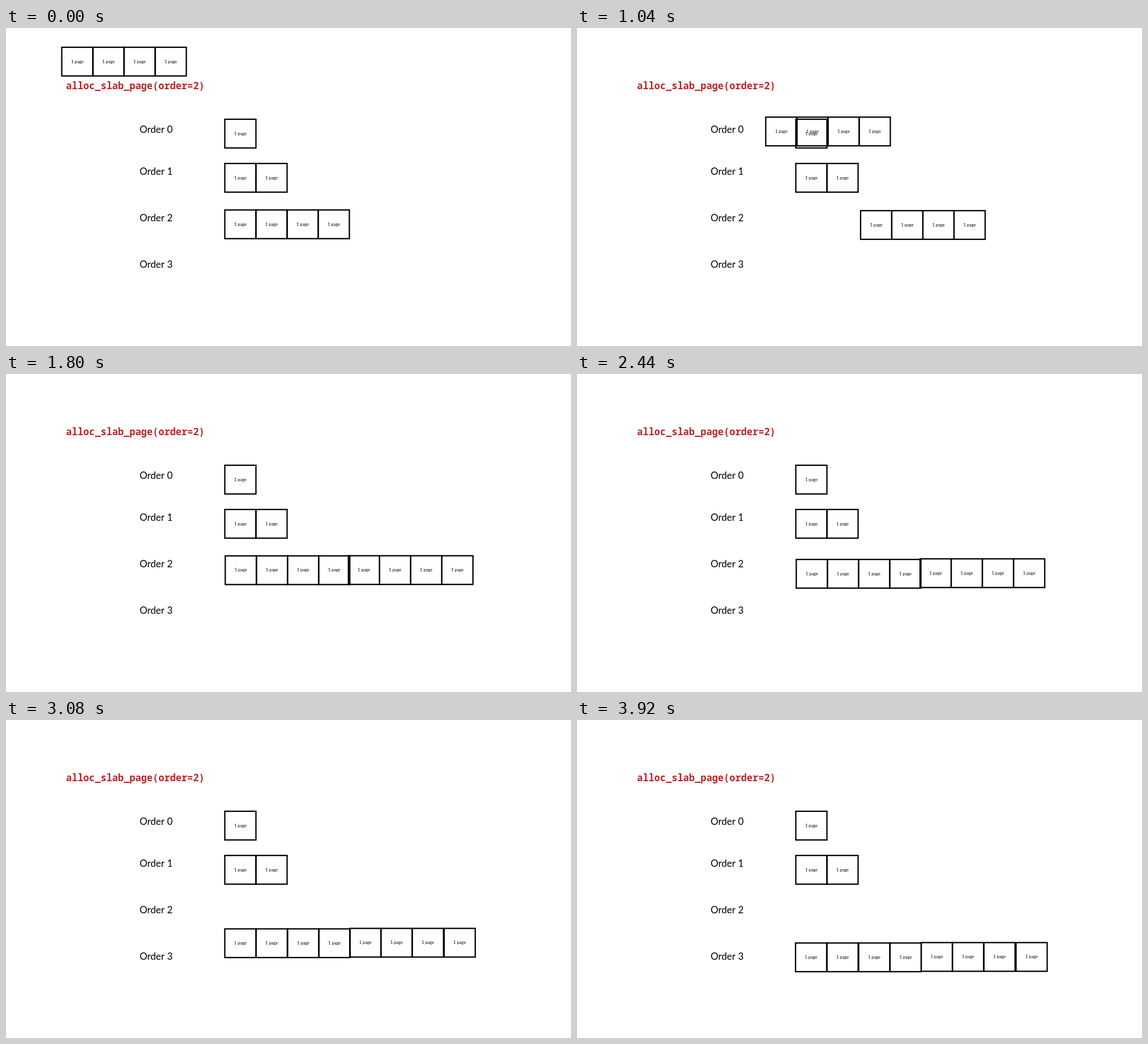
Write an HTML page that moves like this. It is 998 px wide and 561 px high and loops after 3960 ms.

```html
<!DOCTYPE html>
<html lang="en">
<head>
<meta charset="utf-8">
<title>Slab page allocation</title>
<style>
  html, body { margin: 0; width: 100%; height: 100%; overflow: hidden; background: #fff; }
  svg { display: block; width: 998px; height: 561px; }
  rect { fill: none; stroke: #000; stroke-width: 2.3; }
  .page { font: 7.5px Lato, sans-serif; text-anchor: middle; }
  .order { font: 17px Lato, sans-serif; word-spacing: .6px; }
  .call { font: bold 17px "Noto Sans Mono", monospace; fill: #ac2c28; }
</style>
</head>
<body>
<svg id="stage" viewBox="0 0 998 561">
  <text class="call" x="106" y="108">alloc_slab_page(order=2)</text>
  <text class="order" x="236" y="185">Order 0</text>
  <text class="order" x="236" y="259">Order 1</text>
  <text class="order" x="236" y="341">Order 2</text>
  <text class="order" x="236" y="423">Order 3</text>
</svg>
<script>
const LOOP = 3960, TICK = 40, W = 55, H = 50.6;
const stage = document.getElementById('stage');

function add(parent, tag, attrs, text = '') {
  const el = document.createElementNS('http://www.w3.org/2000/svg', tag);
  for (const key in attrs) el.setAttribute(key, attrs[key]);
  el.textContent = text;
  return parent.appendChild(el);
}

function makeCell() {
  const g = add(stage, 'g', {});
  add(g, 'rect', { width: W, height: H });
  add(g, 'text', { class: 'page', x: W / 2, y: 27.6 }, '1 page');
  return g;
}

const place = (cell, x, y) =>
  cell.setAttribute('transform', `translate(${x.toFixed(2)} ${y.toFixed(2)})`);

const mix = (a, b, k) => a + (b - a) * k;

// Constant acceleration to the middle, then constant braking.
function ease(t, start, length) {
  const u = Math.min(1, Math.max(0, (t - start) / length));
  return u < .5 ? 2 * u * u : 1 - 2 * (1 - u) ** 2;
}

// Smooth curve through [position, value] points.
function curve(pts) {
  const last = pts.length - 1;
  const slope = i => (pts[i + 1][1] - pts[i][1]) / (pts[i + 1][0] - pts[i][0]);
  const tangent = i => {
    if (i === 0) return slope(0);
    if (i === last) return slope(last - 1);
    const before = pts[i][0] - pts[i - 1][0], after = pts[i + 1][0] - pts[i][0];
    return (slope(i - 1) * after + slope(i) * before) / (before + after);
  };
  return p => {
    let i = 0;
    while (i < last - 1 && p > pts[i + 1][0]) i++;
    const [p0, v0] = pts[i], [p1, v1] = pts[i + 1];
    const h = p1 - p0, s = (p - p0) / h, r = 1 - s;
    return v0 * (1 + 2 * s) * r * r + v1 * s * s * (3 - 2 * s)
      + h * s * r * (tangent(i) * r - tangent(i + 1) * s);
  };
}

const freedX = curve([[0, 98.5], [.142, 188], [.518, 332.5], [.645, 356.5], [.982, 387], [1, 387.4]]);
const freedY = curve([[0, 34], [.142, 47.4], [.518, 156], [.645, 198.2], [.982, 318.2], [1, 321.7]]);
const buddyY = curve([[0, 321], [.155, 317.5], [.518, 322.2], [.645, 322.6], [1, 320.6]]);
const mergedX = [386, 441.6, 497.5, 553, 608, 663.2, 718.8, 775.5];

place(makeCell(), 386.5, 161);
place(makeCell(), 386.5, 239);
place(makeCell(), 386.5 + W, 239);
const cells = mergedX.map(makeCell);

function draw(t) {
  const join = ease(t, 161, 1720);
  const drop = ease(t, 2118, 1650);
  cells.forEach((cell, i) => {
    const freed = i < 4;
    const x = (freed ? freedX(join) : mix(386.5, 605.8, join)) + W * (i % 4);
    const y = freed ? freedY(join) : buddyY(join);
    place(cell, mix(x, mergedX[i], drop), mix(y, freed ? 393.4 : 392.7, drop));
  });
}

function run() {
  const t = performance.now() % LOOP;
  draw(Math.floor(t / TICK) * TICK);
  requestAnimationFrame(run);
}
run();
</script>
</body>
</html>
```
